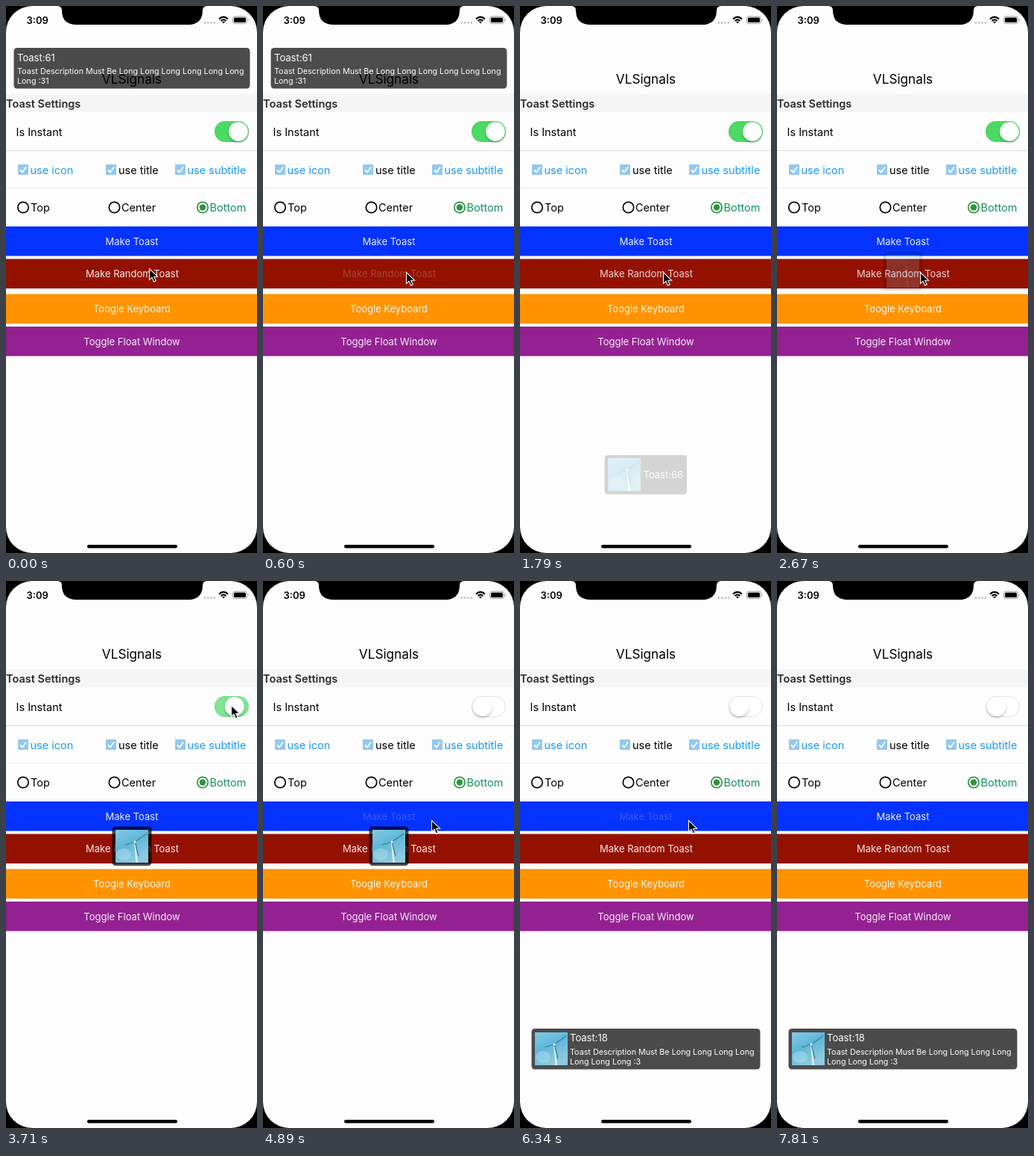
Recreate the animation shown at these times as an HTML page. Size 337 px wide and 732 px high, loop 8 s.

```html
<!DOCTYPE html>
<html lang="en">
<head>
<meta charset="utf-8">
<style>
  html, body { margin: 0; width: 100%; height: 100%; overflow: hidden; background: #000; }
  svg { display: block; width: 100%; height: 100%; font: 14.5px Inter, sans-serif; }
  .mid { text-anchor: middle; }
  .btn { font-size: 13px; fill: #fff; text-anchor: middle; opacity: .92; }
  .title { font-size: 13px; }
  .desc { font-size: 10.75px; }
</style>
</head>
<body>
<svg viewBox="0 0 337 732">
  <defs>
    <linearGradient id="sky" x1="0" y1="0" x2=".5" y2="1">
      <stop offset="0" stop-color="#82c9e4"/>
      <stop offset=".5" stop-color="#5fb7d8"/>
      <stop offset="1" stop-color="#8dcbe0"/>
    </linearGradient>
    <filter id="shadow" x="-30%" y="-30%" width="160%" height="170%">
      <feDropShadow dx="0" dy="2" stdDeviation="1.5" flood-opacity=".28"/>
    </filter>
    <g id="photo">
      <rect width="44" height="44" fill="url(#sky)"/>
      <ellipse cx="11" cy="33" rx="10" ry="8" fill="#b5dfea" opacity=".45"/>
      <path d="M25 17L27.500 44H30L26.500 17Z" fill="#e4eef0"/>
      <path d="M26 16L42 5M26 16L13 20M26 16L31 35" stroke="#3f7f99" stroke-width="1.300"/>
      <circle cx="26" cy="16" r="1.500" fill="#eef5f6"/>
    </g>
    <g id="check">
      <rect width="14" height="14" rx="1" fill="#93c8f1"/>
      <path d="M3 7.500L6 10.500L11 3.500" fill="none" stroke="#fff" stroke-width="1.800"/>
    </g>
    <circle id="radio" r="7.200" fill="none" stroke-width="1.700"/>
  </defs>

  <rect width="337" height="732" rx="35" fill="#fdfdfd"/>
  <path d="M69 0Q75 0 75 6Q75 25 95 25H244Q264 25 264 6Q264 0 270 0Z"/>

  <text x="27.500" y="23.500" font-size="13" font-weight="600">3:09</text>
  <g fill="#c4c4c6">
    <circle cx="267" cy="22.500" r="1.400"/><circle cx="271.300" cy="22.500" r="1.400"/>
    <circle cx="275.600" cy="22.500" r="1.400"/><circle cx="279.900" cy="22.500" r="1.400"/>
  </g>
  <g fill="none" stroke="#000" stroke-width="2">
    <path d="M286 17.500Q292 11.800 298 17.500M288.500 20Q292 16.800 295.500 20"/>
    <path d="M290.500 21.300L292 23L293.500 21.300Z" stroke-width="1"/>
  </g>
  <rect x="304.500" y="14" width="19" height="9.500" rx="2.700" fill="none" stroke="#999"/>
  <rect x="306" y="15.500" width="16" height="6.500" rx="1.500"/>
  <path d="M325 17Q327 18.700 325 20.500Z" fill="#999"/>

  <text class="mid" x="169" y="104" font-size="17.200">VLSignals</text>
  <rect y="118" width="337" height="24" fill="#f5f5f5"/>
  <text y="136" font-weight="600" fill="#2b2b2d">Toast Settings</text>
  <text x="13.500" y="173.500">Is Instant</text>
  <path d="M0 193.500H337" stroke="#dedede"/>
  <path d="M0 243.500H337" stroke="#efefef"/>

  <rect x="280.500" y="154.500" width="45" height="27" rx="13.500" fill="#fff" stroke="#e3e3e3"/>
  <rect id="track" x="280" y="154" width="46" height="28" rx="14" fill="#4cd964"/>
  <circle id="knob" cy="168" r="12.800" fill="#fff" filter="url(#shadow)"/>

  <use href="#check" x="16" y="212"/>
  <use href="#check" x="134" y="212"/>
  <use href="#check" x="227" y="212"/>
  <g fill="#1b9af7">
    <text x="32.500" y="224.500">use icon</text>
    <text x="151" y="224.500" fill="#000">use title</text>
    <text x="243.500" y="224.500">use subtitle</text>
  </g>

  <use href="#radio" x="23" y="269.500" stroke="#000"/>
  <use href="#radio" x="145.500" y="269.500" stroke="#000"/>
  <use href="#radio" x="264" y="269.500" stroke="#2f9440"/>
  <circle cx="264" cy="269.500" r="4.200" fill="#2f9440"/>
  <text x="33" y="275">Top</text>
  <text x="155" y="275">Center</text>
  <text x="273.500" y="275" fill="#15935f">Bottom</text>

  <rect y="295" width="337" height="39.500" fill="#0433ff"/>
  <rect y="338.500" width="337" height="39.500" fill="#941100"/>
  <rect y="385.500" width="337" height="39.500" fill="#ff9300"/>
  <rect y="429" width="337" height="39.500" fill="#942192"/>
  <text class="btn" id="make" x="169" y="319.500">Make Toast</text>
  <text class="btn" id="random" x="169.500" y="363">Make Random Toast</text>
  <text class="btn" x="169" y="410">Toogle Keyboard</text>
  <text class="btn" x="169" y="453.500">Toggle Float Window</text>
  <rect x="109" y="721" width="121" height="4.500" rx="2.250"/>

  <g id="toasts"></g>
  <path id="cursor" d="M.5 .5V15.500L4 12.200L6.500 18L9.200 16.800L6.700 11.200H11.500Z" stroke="#fff" stroke-width="1.100"/>
</svg>
<script>
const LOOP = 8000;
const $ = id => document.getElementById(id);

// box: x, y, width, height; life: fade-in start, fade-out start
const toasts = [
  { box: [10.5, 56, 317, 54.5], life: [-500, 590], title: [15, 74, 'Toast:61'],
    desc: [15, 91, 'Toast Description Must Be Long Long Long Long Long Long', 'Long :31'] },
  { box: [10.5, 618.5, 317, 34.5], life: [848, 1530],
    desc: [15, 634, 'Toast Description Must Be Long Long Long Long Long Long', 'Long :9'] },
  { box: [113.5, 601, 110.5, 52.5], life: [1720, 2410], icon: [118, 605], title: [165.5, 632, 'Toast:66'] },
  { box: [142.5, 328.5, 53, 52.5], life: [2608, 5650], icon: [147, 333] },
  { box: [15.5, 599, 307, 54.5], life: [5980, 9000], icon: [20, 604], title: [67, 616, 'Toast:18'],
    desc: [67, 634, 'Toast Description Must Be Long Long Long Long', 'Long Long Long :3'] },
];
// touch down, touch up
const randomTaps = [[590, 680], [1490, 1560], [2360, 2440]];
const makeTaps = [[4730, 5000], [5600, 5800], [6250, 6470], [7070, 7210]];
// time, x, y
const cursorPath = [[150, 192, 351], [450, 192, 356], [3000, 192, 356], [3500, 302, 166],
  [3760, 302, 166], [4150, 240, 344], [4600, 226, 320]];

const text = (cls, x, y, s) => `<text class="${cls}" x="${x}" y="${y}">${s}</text>`;

$('toasts').innerHTML = toasts.map(({ box: [x, y, w, h], icon, title, desc }) =>
  `<g fill="#fff"><rect x="${x}" y="${y}" width="${w}" height="${h}" rx="4.5" fill="#000" fill-opacity=".7"/>` +
  (icon ? `<use href="#photo" x="${icon[0]}" y="${icon[1]}"/>` : '') +
  (title ? text('title', ...title) : '') +
  (desc ? text('desc', desc[0], desc[1], desc[2]) + text('desc', desc[0], desc[1] + 12.7, desc[3]) : '') +
  '</g>').join('');

function ease(t, start, duration) {
  const p = Math.min(1, Math.max(0, (t - start) / duration));
  return p * p * (3 - 2 * p);
}

function labelOpacity(t, taps) {
  const tap = taps.find(([down, up]) => t >= down && t < up + 300);
  return tap ? .2 + .72 * ease(t, tap[1], 300) : .92;
}

function cursorAt(t) {
  const next = cursorPath.findIndex(k => k[0] > t);
  if (next === 0) return cursorPath[0].slice(1);
  if (next < 0) return cursorPath.at(-1).slice(1);
  const a = cursorPath[next - 1], b = cursorPath[next];
  const p = ease(t, a[0], b[0] - a[0]);
  return [1, 2].map(i => a[i] + (b[i] - a[i]) * p);
}

function draw(now) {
  const t = now % LOOP;
  toasts.forEach(({ life: [start, end] }, i) => {
    $('toasts').children[i].style.opacity = ease(t, start, 230) * (1 - ease(t, end, 230));
  });
  $('random').style.opacity = labelOpacity(t, randomTaps);
  $('make').style.opacity = labelOpacity(t, makeTaps);
  const off = ease(t, 3620, 250);
  $('track').style.opacity = 1 - off;
  $('knob').setAttribute('cx', 312 - 17.5 * off);
  $('cursor').setAttribute('transform', `translate(${cursorAt(t)})`);
  $('cursor').style.opacity = t < 7810 ? 1 : 0;
  requestAnimationFrame(draw);
}
requestAnimationFrame(draw);
</script>
</body>
</html>
```
